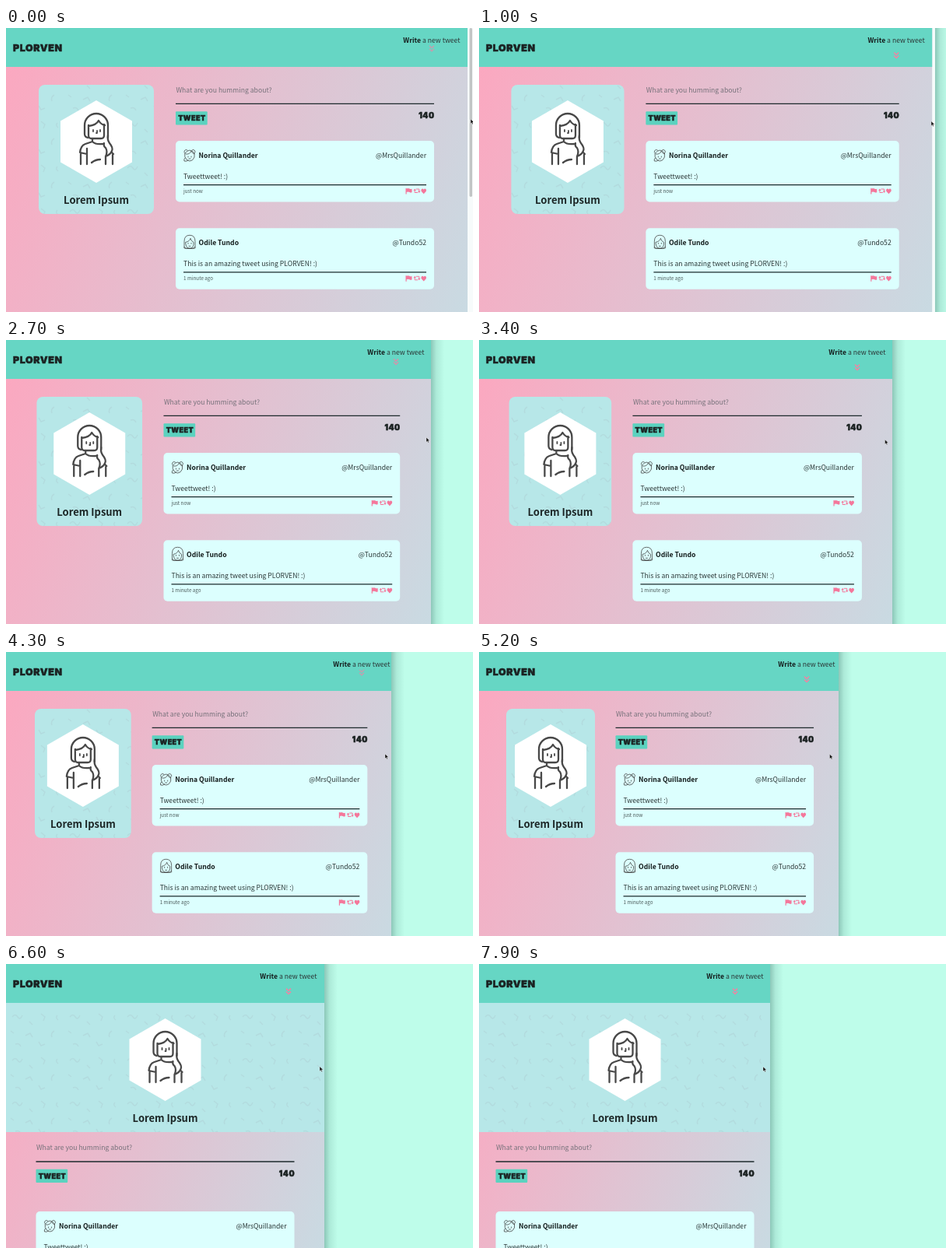
An HTML page for the animation above (8000 ms loop, 600 by 365 pixels).

```html
<!DOCTYPE html>
<html lang="en">
<head>
<meta charset="utf-8">
<title>Resizing a responsive page</title>
<style>
  html, body { margin: 0; width: 100%; height: 100%; overflow: hidden; background: #befdea; }
  svg { display: block; width: 100vw; height: 100vh; }
  text { font: 8.65px "Noto Sans CJK JP", "Noto Sans CJK SC", "Noto Sans", sans-serif; fill: #2b3636; }
  .bold { font-weight: 700; fill: #151d1d; }
  .title { font-size: 13px; font-weight: 700; fill: #1c2626; }
  .hint { fill: #76717a; }
  .small { font-size: 6.3px; fill: #4b5858; }
  .chunky { font-family: Inter, "Liberation Sans", sans-serif; font-weight: 900; letter-spacing: .05em; fill: #1b2222; stroke: #1b2222; stroke-width: .5; }
  .line { fill: none; stroke: #484848; stroke-linecap: round; stroke-linejoin: round; }
</style>
</head>
<body>
<svg viewBox="0 0 600 365" preserveAspectRatio="none">
  <defs>
    <linearGradient id="shade">
      <stop offset="0" stop-color="#2c5f58" stop-opacity=".34"/>
      <stop offset=".4" stop-color="#2c5f58" stop-opacity=".12"/>
      <stop offset="1" stop-color="#2c5f58" stop-opacity="0"/>
    </linearGradient>
    <linearGradient id="sky" gradientUnits="userSpaceOnUse" x1="0" y1="50">
      <stop offset="0" stop-color="#fba8c0"/>
      <stop offset="1" stop-color="#c9dae2"/>
    </linearGradient>
    <pattern id="paper" width="74" height="56" patternUnits="userSpaceOnUse">
      <rect width="74" height="56" fill="#b7e7e8"/>
      <path d="M8 12q4-5 7 0t6-2M45 8l5 4-2 5M62 30q-5 3-3 8M25 36l6-3 3 5M12 47q5-2 7 3M42 44l3 5 5-2M30 18l4 4M66 10q-3 3 1 6M6 30l4 3"
            fill="none" stroke="#a9c5ca" stroke-opacity=".35" stroke-width="1.5"/>
    </pattern>
    <clipPath id="frame"><rect id="pane" height="365"/></clipPath>

    <g id="woman" class="line" stroke-width="2.3">
      <path d="M-11-5q-4-1-4-5v-11a15 15 0 0 1 30 0v16"/>
      <path d="M-10-21v13q0 4 4 4H6q4 0 4-4v-14M-10-20q10-1 13-7 3 5 8 6"/>
      <path d="M-4-15v2M5-15v2M1-14v3h-1" stroke-width="1.8"/>
      <path d="M-5-3v3l-9 3q-6 2-7 11l9 2V9M-5 0q4 4 13 3M15-8q-1 6 2 10 5 6 3 10-2 5-8 7 3-6 0-11-3-2-2-6M20 14l2 2M-12 16v13M12 19v10M-20 16v13M21 17v12M-6 27q5-4 11-4"/>
    </g>
    <g id="avatar0" class="line" stroke-width=".8" stroke="#59636a">
      <path d="M-6-2q6-8 12 0v5q-2 5-6 5t-6-5ZM-5-1q5 1 7-4 1 3 4 4M-6-2a2.500 2.500 0 1 1 3-4M3-6a2.500 2.500 0 1 1 3 4M-2 2v1M2 2v1M-1 5h2M-6 4q-2 2-1 4 3 1 5-1"/>
    </g>
    <g id="avatar1" class="line" stroke-width=".8" stroke="#59636a">
      <path d="M-7 6v-7q0-8 7-8t7 8v7l-3 2H-4ZM-5 0q5-1 6-5 1 4 4 5v3q-1 5-5 5T-5 3ZM-2 1v1M2 1v1M-1 5h2M-7 6q-1 2 1 2h12q2 0 1-2"/>
    </g>
    <g id="actions" fill="#f4779b">
      <path d="M-36.500-3.500h1.200v7.500h-1.200ZM-35.500-3q2-1 4 0t3 0v4.500q-1 1-3 0t-4 0Z"/>
      <path d="M-24.800-1V2h4M-23.200-2.500h4V.500" fill="none" stroke="#f4779b"/>
      <path d="M-26.600-.500l1.800-2.500 1.800 2.500ZM-21 0l1.800 2.500L-17.400 0Z"/>
      <path d="M-13.300 3.700l-3-3.200q-1-2.800 1.300-3.500 1.200 0 1.700 1.200.500-1.200 1.700-1.200 2.300.700 1.300 3.500Z"/>
    </g>
  </defs>
  <g id="scene"></g>
</svg>
<script>
const LOOP = 8000, STEP = 100;
const $ = id => document.getElementById(id);

// Alternating time and value pairs.
const edgeKeys = [0, 601, 900, 588, 1900, 567, 2700, 546, 3400, 531, 4300, 495, 5200, 462, 6300, 413, 6600, 409, 7200, 388, 7900, 374];
const pageKeys = [0, 593, 900, 584, 1900, 566, 2700, 547, 3400, 532, 4300, 503, 5200, 467, 6300, 415, 6600, 409, 7200, 389, 7900, 375];
const mouseKeys = [0, 598, 900, 584, 1900, 563.5, 2700, 541, 3400, 522.5, 4300, 488, 5200, 451.5, 6300, 407, 6600, 404, 7200, 381, 7900, 366];
const heightKeys = [0, 119, 1900, 124, 3400, 130, 4300, 133, 7900, 134];

function track(keys, t) {
  let i = 0;
  while (i < keys.length - 4 && t > keys[i + 2]) i += 2;
  const [t0, a, t1, b] = keys.slice(i, i + 4);
  return a + (b - a) * Math.min(1, (t - t0) / (t1 - t0));
}

const rect = (x, y, w, h, fill, r = 0) =>
  `<rect x="${x}" y="${y}" width="${w}" height="${h}" rx="${r}" fill="${fill}"/>`;
const text = (x, y, s, cls = "", anchor = "start", extra = "") =>
  `<text x="${x}" y="${y}" class="${cls}" text-anchor="${anchor}" ${extra}>${s}</text>`;
const chunky = (x, y, s, size, anchor) => text(x, y, s, "chunky", anchor, `style="font-size:${size}px"`);
const rule = (x1, x2, y) => `<path d="M${x1} ${y}H${x2}" stroke="#1d2a2c" stroke-width="1.4"/>`;
const use = (id, x, y) => `<use href="#${id}" x="${x}" y="${y}"/>`;

const posts = [
  { name: "Norina Quillander", handle: "@MrsQuillander", body: "Tweettweet! :)", age: "just now" },
  { name: "Odile Tundo", handle: "@Tundo52", body: "This is an amazing tweet using PLORVEN! :)", age: "1 minute ago" }
];

function layout(width) {
  const mobile = width < 414, d = width - 593;
  const left = mobile ? width / 2 - 166 : 218 + d * .3373;
  const right = mobile ? width / 2 + 166 : 550 + d * .952;
  const card = mobile ? [0, width] : [42 + d * .0556, 190 + d * .3254];
  return { mobile, left, right, card };
}

function header(width, t) {
  const phase = (t + 650) % 1400 - 700;
  const lift = Math.max(0, 1 - (phase / 330) ** 2);
  const x = width - 46, y = 35 - 9 * lift;
  return rect(0, 0, width, 50, "#66d6c4") + chunky(9, 29.7, "PLORVEN", 12.4) +
    text(width - 9.5, 19, '<tspan class="bold">Write</tspan> a new tweet', "", "end") +
    `<path d="M${x - 3} ${y - 3.5}l3 3 3-3m-6 4l3 3 3-3" fill="none" stroke="#f780a2" stroke-width="1.5" opacity="${1 - .35 * lift}"/>`;
}

function profile({ mobile, card: [a, b] }) {
  const x = (a + b) / 2, y = mobile ? 123 : 146;
  return (mobile ? rect(a, 50, b - a, 166, "url(#paper)") : rect(a, 73, b - a, 166, "url(#paper)", 8)) +
    `<path d="M${x} ${y - 53}l46 26.500v53l-46 26.500l-46-26.500v-53Z" fill="#fff"/>` +
    use("woman", x, y) + text(x, y + 79.7, "Lorem Ipsum", "title", "middle");
}

function composer({ mobile, left, right }) {
  const y = mobile ? 156.6 : 0;
  return text(left + .5, y + 82.5, "What are you humming about?", "hint") + rule(left, right, y + 97.4) +
    rect(left, y + 107.2, 40.7, 17.3, "#5bd2bf", 1) + chunky(left + 3.2, y + 119, "TWEET", 9) +
    chunky(right + .5, y + 116.2, "140", 10, "end");
}

function post(p, i, { mobile, left, right }) {
  const y = 145 + i * 112.3 + (mobile ? 173 : 0), a = left + 10, b = right - 10;
  return rect(left, y, right - left, 78.5, "#dcfffe", 5) + use("avatar" + i, a + 8, y + 18) +
    text(a + 19.6, y + 21.6, p.name, "bold") + text(b, y + 21.6, p.handle, "", "end") +
    text(a, y + 48.8, p.body) + rule(a, b, y + 56.6) +
    text(a, y + 66.8, p.age, "small") + use("actions", right, y + 64.5);
}

function draw(t) {
  const edge = track(edgeKeys, t), width = track(pageKeys, t), box = layout(width);
  const reach = .93 * width + .36 * 315;
  $("pane").setAttribute("width", edge);
  $("sky").setAttribute("x2", reach * .93);
  $("sky").setAttribute("y2", 50 + reach * .36);
  const thumb = t < 700 ? rect(width + 2.5, 0, 3.5, 217, "#c2c5c5", 1.7) : "";
  $("scene").innerHTML = rect(edge, 0, 17, 365, "url(#shade)") +
    `<g clip-path="url(#frame)">` + rect(0, 0, edge, 365, "#f7fbfb") + thumb +
    rect(0, 0, width, 365, "url(#sky)") + header(width, t) + profile(box) + composer(box) +
    posts.map((p, i) => post(p, i, box)).join("") + "</g>" +
    `<path transform="translate(${track(mouseKeys, t) - 1} ${track(heightKeys, t) - 2})" d="M0 0v6l1.400-1.200 1 2 1-.5-1-2h2Z" fill="#111" stroke="#fff" stroke-width=".4"/>`;
}

let shown = -1;
function tick(now) {
  const t = Math.floor(now % LOOP / STEP) * STEP;
  if (t !== shown) draw(shown = t);
  requestAnimationFrame(tick);
}
draw(0);
requestAnimationFrame(tick);
</script>
</body>
</html>
```
